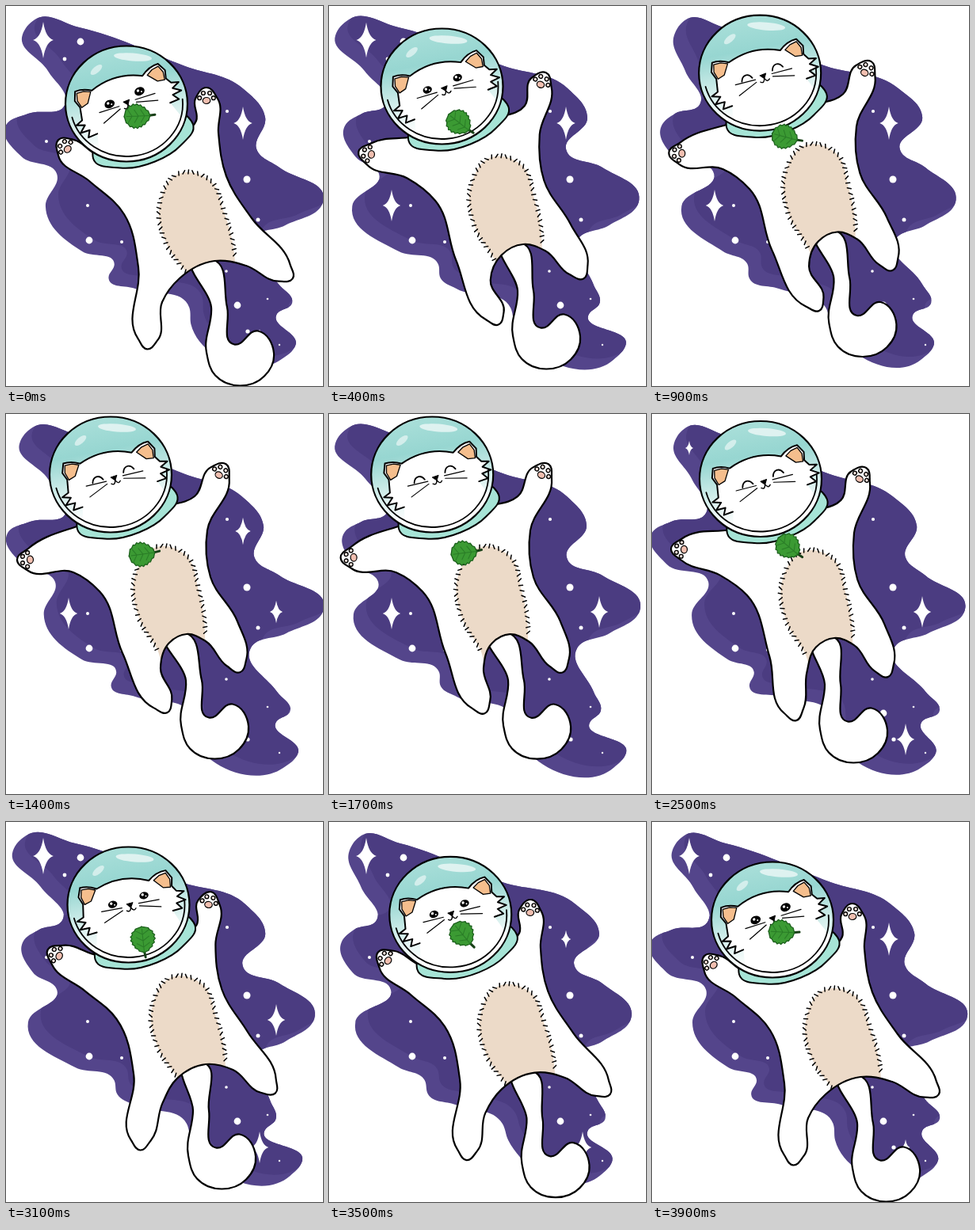
Recreate the animation shown at these times as an HTML page with a canvas. Size 400 by 480 pixels, loop 4 s.

```html
<!DOCTYPE html>
<html lang="en">
<head>
<meta charset="utf-8">
<title>Space cat</title>
<style>
html, body { margin: 0; width: 400px; height: 480px; overflow: hidden; background: #fff; }
canvas { display: block; }
</style>
</head>
<body>
<canvas id="stage" width="400" height="480"></canvas>
<script>
const ctx = document.getElementById('stage').getContext('2d');
const LOOP = 4000, STEP = 100, INK = '#000';
const rad = a => a * Math.PI / 180;

// ---- Timing: key poses joined by smooth monotone curves ----
const TIMES = [0, 400, 1400, 2100, 2500, 3100, 3900];

function mix(poses, t) {
  const n = TIMES.length;
  const time = i => TIMES[(i + n) % n] + Math.floor(i / n) * LOOP;
  const pose = i => poses[((i + n) % n) % poses.length];
  let i = n - 1;
  while (TIMES[i] > t) i--;
  const h = time(i + 1) - time(i), u = (t - time(i)) / h;
  const mean = (p, q) => p * q > 0 ? 2 * p * q / (p + q) : 0;
  return pose(i).map((v, k) => {
    const slope = j => (pose(j + 1)[k] - pose(j)[k]) / (time(j + 1) - time(j));
    const a = slope(i - 1), b = slope(i), c = slope(i + 1);
    return v + b * h * u * u * (3 - 2 * u)
      + h * u * (1 - u) * (mean(a, b) * (1 - u) - mean(b, c) * u);
  });
}

// ---- Cat poses: low, rising, high, high, sinking, falling, then low again ----
// crotch x, y, sprawl, tail swing
const core = [
  [263, 322, 1, 33], [245, 301, 0.25, 30], [228, 278, 0, 36],
  [228, 279, 0, 32], [230, 283, 0.05, 25], [252, 306, 0.65, 21]
];
// left paw, left foot, right foot, right paw
const limbs = [
  [76, 179, 179, 421, 351, 337, 253, 117],
  [51, 187, 209, 391, 315, 333, 268, 97],
  [28, 184, 198, 366, 291, 314, 270, 75],
  [31, 176, 183, 369, 290, 315, 267, 75],
  [38, 171, 179, 375, 293, 320, 263, 80],
  [65, 168, 170, 402, 331, 333, 256, 102]
];
// helmet x, y, tilt of the face
const heads = [
  [152, 123.5, -23], [142.5, 101.5, -22], [132, 76.5, -19],
  [129, 76.5, -19], [137, 82, -20], [154.5, 104.5, -16]
];
const leaves = [
  [167, 139, -2], [165, 148, 38], [173, 177, -8], [170, 171, -5], [173, 168, 40], [173, 150, 84], [165, 139, 3]
];
// body edge around the crotch, drawn in and sprawled
const tucked = [-143, -78, -110, -54, -81, 24, -33, 43, -22, 11, 0, 0, 24, 9, 64, -16, 30, -72, 26, -131, 10, -174];
const sprawled = [-158, -101, -114, -59, -96, 8, -66, 52, -44, 22, 0, 0, 40, 6, 47, -54, 15, -107, 5, -162, -23, -177];

// ---- Space: outline x, y and its sideways sway (cosine, sine) ----
const cloud = [
  [19, 37, 0, -11], [35, 17, 0, -10], [90, 27, 2, -2], [222, 76, 4, 0], [304, 104, -6, -4],
  [332, 141, -6, -7], [309, 181, 6, -9], [345, 204, 0, 0], [391, 245, 10, 2], [350, 277, 3, 4],
  [309, 296, -1, 4], [339, 351, 4, -5], [351, 375, 9, -8], [332, 390, 9, -3], [365, 428, 2, 10],
  [348, 447, 0, 11], [231, 402, 3, 4], [226, 381, 6, 4], [161, 357, 2, 0], [131, 344, 0, 10],
  [131, 326, 7, 8], [91, 310, 5, -2], [38, 253, 11, -7], [69, 212, -6, -7], [27, 190, -7, 5],
  [11, 152, -11, 7], [33, 136, -4, 8], [68, 125, 7, 5], [46, 82, 7, 0]
];
// x, y, radius
const dots = [
  [94, 45, 4.4], [74, 67, 2.4], [51, 171, 2], [146, 298, 2], [103, 252, 2], [105, 296, 4.4], [279, 133, 2.1],
  [304, 219, 4.5], [318, 270, 2.5], [292, 378, 4.4], [278, 335, 1.8], [330, 370, 1.3], [345, 428, 1.2], [305, 411, 2.6]
];
// x, y, size, first moment shown
const stars = [
  [47, 43, 23, 2390], [299, 148, 21, 3350], [79, 252, 20, 20], [341, 250, 20, 1200], [320, 411, 20, 1760]
];
const STAR_SPAN = 2280, STAR_FADE = 280;

// ---- Drawing helpers ----
const pairs = v => v.flatMap((x, i) => i % 2 ? [] : [[x, v[i + 1]]]);
const polar = (x, y, r, a) => [x + r * Math.cos(rad(a)), y + r * Math.sin(rad(a))];

// Closed smooth curve as cubic pieces.
function curve(pts) {
  const n = pts.length;
  const at = i => pts[(i + n) % n];
  const dist = i => Math.hypot(at(i + 1)[0] - at(i)[0], at(i + 1)[1] - at(i)[1]) || 1;
  const tangent = i => {
    const a = dist(i - 1), b = dist(i);
    const d = [0, 1].map(k => (at(i)[k] - at(i - 1)[k]) / a * b + (at(i + 1)[k] - at(i)[k]) / b * a);
    const l = Math.hypot(...d) || 1;
    return d.map(v => v / l);
  };
  return pts.map((p, i) => {
    const q = at(i + 1), s = tangent(i), e = tangent(i + 1), h = dist(i) * 0.36;
    return [p, [p[0] + s[0] * h, p[1] + s[1] * h], [q[0] - e[0] * h, q[1] - e[1] * h], q];
  });
}

function blob(pts) {
  const path = new Path2D();
  curve(pts).forEach(([p, a, b, q], i) => {
    if (!i) path.moveTo(...p);
    path.bezierCurveTo(...a, ...b, ...q);
  });
  path.closePath();
  return path;
}

function poly(pts, closed) {
  const path = new Path2D();
  pts.forEach(p => path.lineTo(...p));
  if (closed) path.closePath();
  return path;
}

function oval(x, y, rx, ry = rx, turn = 0) {
  const path = new Path2D();
  path.ellipse(x, y, rx, ry, turn, 0, Math.PI * 2);
  return path;
}

function paint(path, fill, line, width = 2) {
  if (fill) { ctx.fillStyle = fill; ctx.fill(path); }
  if (line) { ctx.strokeStyle = line; ctx.lineWidth = width; ctx.stroke(path); }
}

function group(draw, x = 0, y = 0, turn = 0) {
  ctx.save();
  ctx.translate(x, y);
  ctx.rotate(rad(turn));
  draw();
  ctx.restore();
}

// ---- Parts ----
function drawStar([x, y, size, start], t) {
  const age = (t - start + LOOP) % LOOP;
  const k = Math.min(1, age / STAR_FADE, (STAR_SPAN - age) / STAR_FADE);
  if (k <= 0) return;
  const h = size * k, w = h * 0.56, c = h * 0.13;
  const path = new Path2D();
  path.moveTo(x, y - h);
  path.quadraticCurveTo(x + c, y - c, x + w, y);
  path.quadraticCurveTo(x + c, y + c, x, y + h);
  path.quadraticCurveTo(x - c, y + c, x - w, y);
  path.quadraticCurveTo(x - c, y - c, x, y - h);
  paint(path, '#fff');
}

function drawSky(t) {
  const a = Math.PI * 6 * t / LOOP - 0.15;
  const shape = blob(cloud.map(([x, y, c, s]) => [x + c * Math.cos(a) + s * Math.sin(a), y]));
  paint(shape, '#54458b');
  group(() => {
    ctx.clip(shape);
    ctx.translate(16, -14);
    paint(shape, '#4b3c81');
  });
  dots.forEach(([x, y, r]) => paint(oval(x, y, r), '#fff'));
  stars.forEach(star => drawStar(star, t));
}

function drawTail([x, y, , swing]) {
  const shape = [[-37, -57], [-43, 0], [-32, 29], [-1, 42], [30, 30], [42, 1], [22, -27], [-8, -10], [-17, -57]]
    .map(([a, b]) => [x + swing + a, y + 115.5 + b]);
  paint(blob([[x - 23, y - 2], ...shape, [x - 3, y - 2]]), '#fff', INK, 2.2);
}

function drawBelly([x, y, sprawl]) {
  const shape = [[3, 129], [-22, 86], [-26, 35], [0, 0], [35, 8], [54, 54], [63, 114], [60, 150], [15, 155]];
  group(() => {
    paint(blob(shape), '#ecdac8');
    const hairs = new Path2D();
    curve(shape).slice(0, 6).forEach(([p, a, b, q], s) => {
      const n = Math.round(Math.hypot(q[0] - p[0], q[1] - p[1]) / 6.5);
      for (let i = 0; i < n; i++) {
        const u = i / n, v = 1 - u;
        const at = k => v * v * v * p[k] + 3 * u * v * v * a[k] + 3 * u * u * v * b[k] + u * u * u * q[k];
        const dir = k => v * v * (a[k] - p[k]) + 2 * u * v * (b[k] - a[k]) + u * u * (q[k] - b[k]);
        const angle = Math.atan2(dir(1), dir(0)) - Math.PI / 2 + Math.sin(i * 5 + s * 3) * 0.7;
        const dx = Math.cos(angle), dy = Math.sin(angle);
        hairs.moveTo(at(0) - dx * 2, at(1) - dy * 2);
        hairs.lineTo(at(0) + dx * 3, at(1) + dy * 3);
      }
    });
    paint(hairs, null, INK, 1.5);
  }, x - 38 - 7 * sprawl, y - 110, 1 - 5 * sprawl);
}

function drawPads(x, y, turn) {
  group(() => {
    paint(oval(-2.5, 0, 4, 4.8), '#f1bfb0', INK, 1.2);
    [-78, -27, 27, 78].forEach(a => paint(oval(...polar(-1, 0, 9, a), 2.4), '#fbe6de', INK, 1.4));
  }, x, y, turn);
}

function drawBody(mid, limb, head) {
  const [x, y, sprawl] = mid;
  const edge = pairs(tucked.map((v, i) => v + (sprawled[i] - v) * sprawl + (i % 2 ? y : x)));
  const ends = pairs(limb);
  const turns = [180 + 45 * sprawl, 48 - (ends[1][0] - x) * 0.55, 71 - 36 * sprawl, -57 - 33 * sprawl];
  const tip = (i, r) => [90, 0, -90].map(d => polar(...ends[i], r, turns[i] + d));
  const body = blob([
    [head[0] - 38, head[1] + 64], ...tip(0, 14), ...edge.slice(0, 3), ...tip(1, 12.5), ...edge.slice(3, 7),
    ...tip(2, 13), ...edge.slice(7, 10), ...tip(3, 14), edge[10], [head[0] + 70, head[1] + 40]
  ]);
  paint(body, '#fff');
  group(() => {
    ctx.clip(body);
    drawBelly(mid);
  });
  paint(body, null, INK, 2.2);
  [0, 3].forEach(i => drawPads(...ends[i], turns[i]));
}

function drawEyes(t, wide) {
  const shut = t >= 800 && t < 2800;
  [-21, 20].forEach(x => {
    const y = -7.5;
    if (shut) {
      const lid = new Path2D();
      lid.moveTo(x - 7, y + 4);
      lid.bezierCurveTo(x - 4, y - 4, x + 4, y - 4, x + 7, y + 4);
      paint(lid, null, INK, 1.8);
      return;
    }
    const r = wide ? 6.6 : 5.8;
    paint(oval(x, y, r, r * 0.78), INK);
    paint(oval(x - 1.5, y - 1.5, 1.7), '#fff');
    paint(oval(x + 2.2, y + 1.2, 1), '#fff');
  });
}

function drawFace(t) {
  const wide = t < 200 || t >= 3600;
  // The right ear sits lower than the left one.
  const mirror = pts => pts.map(([x, y]) => [-x, y < -10 ? y + 8.5 : y]);
  const left = [[-55, -39], [-60, -28], [-57, -18], [-61, -2], [-70, 1], [-60, 5], [-69, 12], [-57, 13], [-62, 21], [-50, 21]];
  const right = mirror(left);
  const ear = [[-54, -36], [-57, -27], [-55, -17], [-46, -19], [-37, -31], [-45, -35]];
  const skull = poly([...left].reverse());
  skull.quadraticCurveTo(-45, -39, -35, -32);
  skull.quadraticCurveTo(0, -42, 31, -24);
  skull.quadraticCurveTo(43, -32, ...right[0]);
  right.slice(1).forEach(p => skull.lineTo(...p));
  const fill = new Path2D(skull);
  fill.lineTo(70, 90);
  fill.lineTo(-70, 90);
  paint(fill, '#fff');
  paint(skull, null, INK, 2);
  [ear, mirror(ear)].forEach(pts => paint(poly(pts, true), '#f5be8d', INK, 1.3));
  drawEyes(t, wide);
  paint(poly([[-4, -3], [4, -3], [0, 2.5]], true), INK, INK, 1);
  const mouth = new Path2D();
  mouth.moveTo(-6, 5);
  mouth.quadraticCurveTo(-2, 9, 0, 2);
  mouth.quadraticCurveTo(2, 9, 6, 5);
  paint(mouth, null, INK, 1.4);
  if (wide) paint(oval(0, 9, 4), '#e9a39a', INK, 1.2);
  [-1, 1].forEach(s => {
    paint(poly([[s * 11, 0], [s * 37, s * 2.5]]), null, INK, 1.2);
    paint(poly([[s * 11, 3.5], [s * 37, 12]]), null, INK, 1.2);
  });
}

function drawHead([x, y, tilt], sprawl, t) {
  const collar = [[-42, 57], [-42, 69], [-8, 81], [36, 73], [68, 53], [84, 26], [78, 17], [20, 40]];
  group(() => paint(blob(collar), '#a6e4d6', INK), x, y);
  const glass = oval(x, y, 77, 73);
  const tint = ctx.createLinearGradient(x - 10, y - 73, x + 14, y + 50);
  ['#a9dfd9', '#97d6d1', '#d0edea', '#fff'].forEach((c, i) => tint.addColorStop(i / 3, c));
  paint(glass, tint);
  group(() => {
    ctx.clip(glass);
    paint(oval(x + 8, y - 59, 24, 5, 0.08), 'rgba(255,255,255,.65)');
    paint(oval(x - 38, y - 43, 9, 4, -0.7), 'rgba(255,255,255,.55)');
    group(() => drawFace(t), x + 5 - 4 * sprawl, y + 5 - 6 * sprawl, tilt);
  });
  const rim = new Path2D();
  rim.ellipse(x, y, 71, 66.5, 0, rad(-5), rad(165));
  paint(rim, null, INK, 1.8);
  paint(glass, null, INK, 2.2);
}

function drawLeaf([x, y, turn]) {
  group(() => {
    const side = Array.from({ length: 15 }, (_, i) => {
      const u = i / 14;
      const w = 14.5 * Math.pow(Math.max(0, Math.sin(Math.PI * Math.pow(u, 0.85))), 0.65);
      return [-18 + 33 * u, w + (i % 2 ? 1.2 : -0.6)];
    });
    paint(poly([[12, 0], [21, -1]]), null, '#173f16', 3);
    paint(poly([...side, ...side.map(([a, b]) => [a, -b]).reverse()], true), '#3b9a33', '#1d611d', 1.3);
    const veins = poly([[-15, 0], [14, 0]]);
    [-8, 0, 8].forEach(v => {
      veins.moveTo(v - 5, -8);
      veins.lineTo(v, 0);
      veins.lineTo(v - 5, 8);
    });
    paint(veins, null, '#2a7c27', 1);
  }, x, y, turn);
}

function draw(t) {
  const pose = track => mix(track.length < 7 ? [...track, track[0]] : track, t);
  const mid = pose(core), head = pose(heads);
  ctx.fillStyle = '#fff';
  ctx.fillRect(0, 0, 400, 480);
  ctx.lineCap = ctx.lineJoin = 'round';
  drawSky(t);
  drawTail(mid);
  drawBody(mid, pose(limbs), head);
  drawHead(head, mid[2], t);
  drawLeaf(pose(leaves));
}

const began = performance.now();
let shown = -1;
function tick() {
  const t = Math.floor((performance.now() - began) / STEP) * STEP % LOOP;
  if (t !== shown) draw(shown = t);
  requestAnimationFrame(tick);
}
tick();
</script>
</body>
</html>
```
